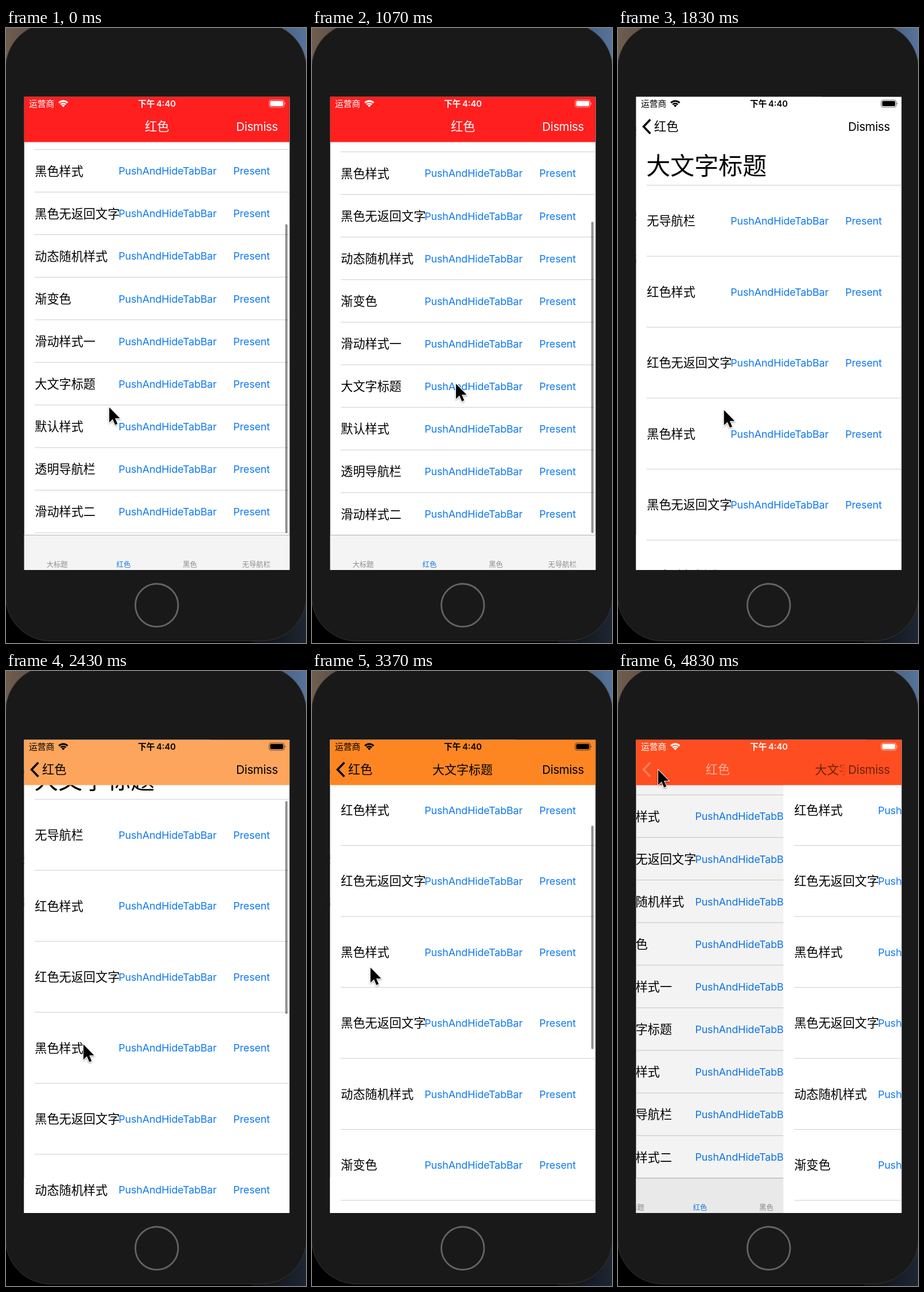
An HTML page that plays this animation: 523 px wide and 1070 px high, repeating every 4.86 s.

```html
<!DOCTYPE html>
<html lang="zh-CN">
<head>
<meta charset="utf-8">
<title>Navigation bar styles</title>
<style>
html, body { margin: 0; width: 100%; height: 100%; overflow: hidden; background: #000; }
svg { display: block; width: 523px; height: 1070px; }
text { font-family: Inter, "Noto Sans CJK SC", "Noto Sans CJK", sans-serif; fill: #000; white-space: pre; }
.label { font-size: 21.15px; }
.link { font-size: 17.9px; letter-spacing: -.15px; fill: #0f79ef; }
.rule { fill: #cdcdd0; }
.tab { font-size: 12.35px; text-anchor: middle; fill: #8c8c8c; font-weight: 500; }
.tab.on { fill: #0f79ef; }
.thumb { fill: #000; fill-opacity: .43; }
.large { font-size: 42px; font-weight: 500; }
.title { font-size: 21px; font-weight: 500; text-anchor: middle; }
.dismiss { font-size: 20.4px; letter-spacing: -.3px; text-anchor: end; }
.status text { font-size: 14.8px; fill: inherit; }
</style>
</head>
<body>
<svg viewBox="0 0 523 1070">
  <defs>
    <linearGradient id="left"><stop stop-color="#6f5d4e"/><stop offset="1" stop-color="#4d443d"/></linearGradient>
    <linearGradient id="right"><stop stop-color="#3c506b"/><stop offset="1" stop-color="#56749a"/></linearGradient>
    <linearGradient id="sea"><stop stop-color="#0b0d11"/><stop offset="1" stop-color="#1d2632"/></linearGradient>
    <linearGradient id="fade" gradientUnits="userSpaceOnUse" x1="382" x2="398">
      <stop stop-color="#fff"/><stop offset="1" stop-color="#000"/>
    </linearGradient>
    <mask id="titleMask" maskUnits="userSpaceOnUse" x="0" y="119" width="523" height="80">
      <rect y="119" width="523" height="80" fill="url(#fade)"/>
    </mask>
    <clipPath id="screen"><rect x="31.5" y="119.5" width="463" height="823.5"/></clipPath>
    <clipPath id="body"><rect x="31.5" y="198.5" width="463" height="744.5"/></clipPath>
    <filter id="soft" x="-50%" y="-50%" width="200%" height="200%">
      <feDropShadow dx="0" dy="1.5" stdDeviation="1.5" flood-opacity=".4"/>
    </filter>
  </defs>

  <rect width="100" height="80" fill="url(#left)"/>
  <rect x="440" width="83" height="80" fill="url(#right)"/>
  <rect x="428" y="980" width="95" height="90" fill="url(#sea)"/>
  <rect x="-.5" y="-8" width="524" height="1074.5" rx="78" fill="#191919" stroke="#353535"/>
  <circle cx="262.8" cy="1004.3" r="37.3" fill="#191919" stroke="#646464" stroke-width="2.8"/>

  <g clip-path="url(#screen)">
    <g id="under">
      <rect x="31.5" y="119.5" width="463" height="823.5" fill="#fff"/>
      <g id="underList"></g>
      <rect id="underThumb" class="thumb" x="486.8" width="4" rx="2"/>
      <rect x="31.5" y="882" width="463" height="61" fill="#f4f4f4"/>
      <rect x="31.5" y="881.8" width="463" height="1" fill="#b0b0b0"/>
      <g id="tabs"></g>
    </g>
    <rect id="underBar" x="31.5" y="119.5" width="463" height="79" fill="rgb(255,31,31)"/>
    <rect id="dim" x="31.5" y="119.5" width="463" height="823.5"/>
    <g id="panel">
      <rect x="31.5" y="119.5" width="463" height="823.5" fill="#fff"/>
      <g clip-path="url(#body)">
        <g id="panelList"><text class="large" x="49.3" y="255">大文字标题</text></g>
        <rect id="panelThumb" class="thumb" x="486.8" width="4" rx="2"/>
      </g>
    </g>

    <rect id="bar" x="31.5" y="119.5" width="463" height="79"/>
    <path id="chevron" d="M56.3 159.3 44.6 171.5 56.3 183.7" fill="none" stroke-width="3.6"/>
    <text id="back" class="label" y="179">红色</text>
    <g mask="url(#titleMask)"><text id="title" class="title" x="262.5" y="179">大文字标题</text></g>
    <text id="dismiss" class="dismiss" x="474" y="178.7">Dismiss</text>
    <g id="status" class="status">
      <text x="40" y="137.3">运营商</text>
      <text x="263" y="137.3" text-anchor="middle" font-weight="600">下午&#x2009;4:40</text>
      <g id="wifi" fill="none"></g>
      <rect x="458.7" y="125.3" width="26.4" height="12.6" rx="3.6" fill="none" stroke="currentColor" stroke-opacity=".6"/>
      <rect x="460.5" y="127.1" width="22.8" height="9" rx="2"/>
      <path d="M486.2 129.6q2.3 2 0 4z" opacity=".6"/>
    </g>
  </g>

  <path id="cursor" d="M0 0V26.2L6 20.6 10.3 30.4 14.3 28.7 10.1 19H18.6Z" stroke="#fff" stroke-width="1.8" paint-order="stroke" filter="url(#soft)"/>
</svg>

<script>
const LOOP = 4860, WIDTH = 463, PUSH = 1100, POP = 4738;
const RED = [255, 31, 31], ORANGE = [253, 134, 34];
const styles = ['无导航栏', '红色样式', '红色无返回文字', '黑色样式', '黑色无返回文字',
  '动态随机样式', '渐变色', '滑动样式一', '大文字标题', '默认样式', '透明导航栏', '滑动样式二'];

const $ = id => document.getElementById(id);
const set = (id, attrs) => { for (const k in attrs) $(id).setAttribute(k, attrs[k]); };
const clamp = v => Math.max(0, Math.min(1, v));

function rows(names, top, height) {
  return names.map((name, i) => {
    const y = top + i * height, mid = y + height / 2 + .4;
    return `<text class="label" x="50.3" y="${mid + 7.8}">${name}</text>
      <text class="link" x="196.3" y="${mid + 6.5}">PushAndHideTabBar</text>
      <text class="link" x="396.3" y="${mid + 6.5}">Present</text>
      <rect class="rule" x="50" y="${y + height - .5}" width="445" height="1"/>`;
  }).join('');
}

$('underList').innerHTML = rows(styles.slice(2), 141.4, 74.1);
$('panelList').innerHTML += '<rect class="rule" x="50" y="273" width="445" height="1"/>' +
  rows(styles.slice(0, 8), 273.5, 123.5);
$('tabs').innerHTML = ['大标题', '红色', '黑色', '无导航栏'].map((name, i) =>
  `<text class="tab${i === 1 ? ' on' : ''}" x="${89.2 + i * 115.7}" y="938">${name}</text>`).join('');

// Quarter-circle arcs opening upwards
$('wifi').innerHTML = [[10.8, 2.9], [6.5, 2.6], [2.1, 4.2]].map(([r, w]) => {
  const d = r * Math.SQRT1_2;
  return `<path d="M${99.8 - d} ${137.8 - d}A${r} ${r} 0 0 1 ${99.8 + d} ${137.8 - d}" stroke="currentColor" stroke-width="${w}"/>`;
}).join('');

// Monotone cubic through [time, value] points
function track(keys, t) {
  const last = keys.length - 1;
  if (t <= keys[0][0]) return keys[0][1];
  if (t >= keys[last][0]) return keys[last][1];
  const slope = i => (keys[i + 1][1] - keys[i][1]) / (keys[i + 1][0] - keys[i][0]);
  const tangent = i => {
    if (i === 0 || i === last) return 0;
    const a = slope(i - 1), b = slope(i);
    return a * b <= 0 ? 0 : 2 * a * b / (a + b);
  };
  const i = keys.findIndex(k => k[0] > t) - 1;
  const [t0, v0] = keys[i], [t1, v1] = keys[i + 1], h = t1 - t0, s = (t - t0) / h;
  return v0 * (1 + 2 * s) * (1 - s) ** 2 + v1 * s * s * (3 - 2 * s)
    + h * s * (1 - s) * (tangent(i) * (1 - s) - tangent(i + 1) * s);
}

const scrollKeys = [[2220, 0], [2430, 50], [2770, 140], [3000, 190], [3330, 217]];
const cursorKeys = [[0, 180, 660], [700, 251, 619], [1450, 251, 619], [2150, 134, 700], [2220, 134, 700],
  [2430, 135, 650], [2770, 141, 566], [2950, 142, 532], [3370, 102, 516], [3600, 98, 506], [4550, 70, 172]];
const cursorX = cursorKeys.map(([t, x]) => [t, x]);
const cursorY = cursorKeys.map(([t, , y]) => [t, y]);

// Critically damped spring, 1 falling to 0
const spring = ms => ms <= 0 ? 1 : (1 + ms / 50) * Math.exp(-ms / 50);

function draw(t) {
  const popping = t > POP;
  const away = popping ? 1 - spring(t - POP) : spring(t - PUSH);
  const offset = track(scrollKeys, t);
  const bounce = 4.2 * Math.exp(-t / 150);

  set('under', { transform: `translate(${-139 * (1 - away)} 0)` });
  set('underList', { transform: `translate(0 ${-bounce})` });
  set('underThumb', { y: 337 + bounce, height: 542 - bounce });
  set('underBar', { opacity: away });
  set('dim', { opacity: .11 * (1 - away) });
  set('panel', { transform: `translate(${WIDTH * away} 0)` });
  set('panelList', { transform: `translate(0 ${-offset})` });

  const rest = Math.max(0, 64 - offset);
  const top = rest ? 276.5 - offset : 197.5 + (offset - 64) * .4675;
  const bottom = rest ? 590 + rest * .5 : 586.5 + (offset - 64) * .4675;
  set('panelThumb', {
    y: top, height: bottom - top,
    opacity: clamp((t - 2220) / 80) * clamp((3950 - t) / 250)
  });

  const mix = popping ? away : 0;
  const color = ORANGE.map((c, i) => Math.round(c + (RED[i] - c) * mix));
  set('bar', { fill: `rgb(${color})`, opacity: clamp(offset / 68) });

  const tint = away > .5 ? '#fff' : '#000', strength = Math.max(away, 1 - away);
  set('chevron', { stroke: tint, opacity: (1 - away) ** 1.6 });
  set('back', {
    x: 63 + 161 * away + 18 * away ** 6, opacity: strength,
    style: `fill:${tint};font-weight:${away === 1 ? 500 : 400}`
  });
  set('title', {
    transform: `translate(${240 * away} 0)`,
    opacity: clamp((offset - 55) / 15) * (1 - .75 * away)
  });
  set('dismiss', { style: `fill:${away > .7 ? '#fff' : '#000'}`, opacity: strength });

  const ink = popping || t < PUSH ? '#fff' : '#000';
  set('status', { style: `fill:${ink};color:${ink}` });
  set('cursor', { transform: `translate(${track(cursorX, t)} ${track(cursorY, t)})` });
}

const start = performance.now();
function tick() {
  draw((performance.now() - start) % LOOP);
  requestAnimationFrame(tick);
}
tick();
</script>
</body>
</html>
```
